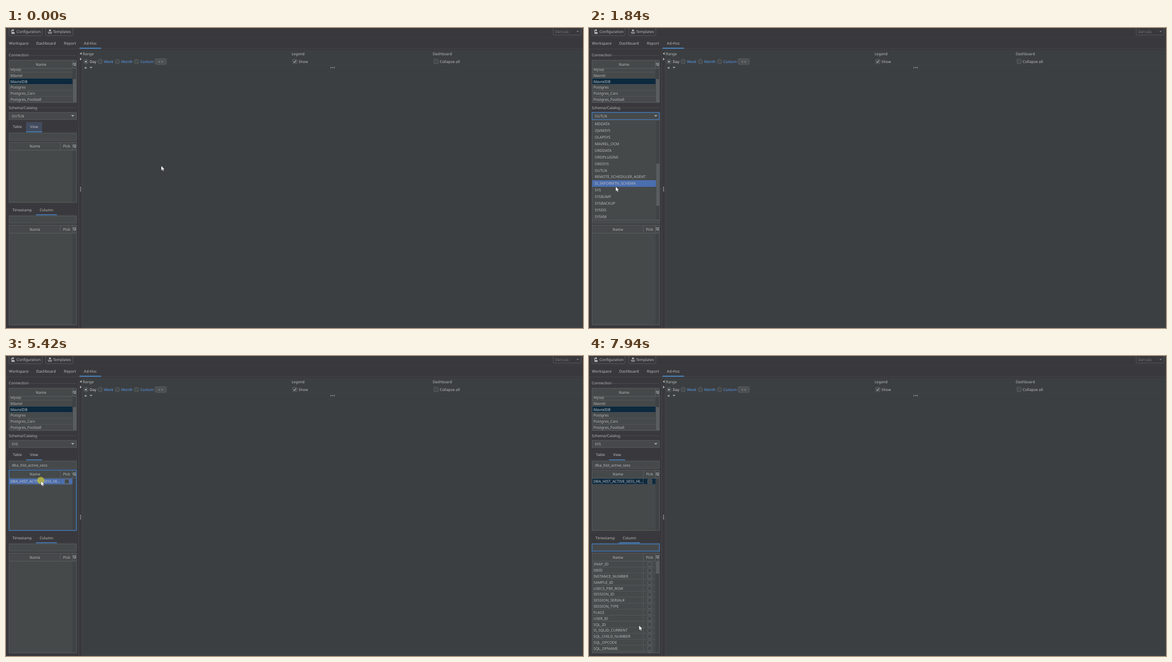
An HTML page with a canvas that plays this animation: 1037 px wide and 540 px high, repeating every 8000 ms.

```html
<!DOCTYPE html>
<html lang="en">
<head>
<meta charset="utf-8">
<title>Ad-hoc query panel</title>
<style>
html, body { margin: 0; width: 100%; height: 100%; overflow: hidden; background: #3c3f41; }
canvas { display: block; }
</style>
</head>
<body>
<canvas id="stage" width="1037" height="540"></canvas>
<script>
const ctx = document.getElementById('stage').getContext('2d');
const LOOP = 8000, TICK = 67.7, ROW = 10.83, OPTION = 11.92, OPTION_TOP = 166.7;
const C = {
  side: '#39383c', main: '#3c3f41', cell: '#45494a', line: '#5e6163', grid: '#595c5e', faint: '#47494b',
  text: '#bbbbbb', link: '#589df6', accent: '#4a88c7', focus: '#4374ad',
  select: '#4b6eaf', dimSelect: '#0d293e', track: '#3f4244', thumb: '#5a5d5f',
  tabFocus: '#424b5e', tabHover: '#313236', off: '#777a7c'
};

const connections = ['MySql', 'Mavrel', 'MavrelDB', 'Postgres', 'Postgres_Cars', 'Postgres_Football'];
const schemas = ['MDDATA', 'OJVMSYS', 'OLAPSYS', 'MAVREL_OCM', 'ORDDATA', 'ORDPLUGINS', 'ORDSYS', 'OUTLN',
  'REMOTE_SCHEDULER_AGENT', 'SI_INFORMTN_SCHEMA', 'SYS', 'SYS$UMF', 'SYSBACKUP', 'SYSDG', 'SYSKM'];
const views = ['ACLMV$_BASE_VIEW', 'ACLMV$_MVINFO', 'ALL$OLAP2_AWS', 'ALL_ALL_TABLES', 'ALL_ANALYTIC_VIEWS',
  'ALL_ANALYTIC_VIEW_ATTR...', 'ALL_ANALYTIC_VIEW_BASE...', 'ALL_ANALYTIC_VIEW_CALC...', 'ALL_ANALYTIC_VIEW_CLASS...'];
const columns = ['SNAP_ID', 'DBID', 'INSTANCE_NUMBER', 'SAMPLE_ID', 'USECS_PER_ROW', 'SESSION_ID', 'SESSION_SERIAL#',
  'SESSION_TYPE', 'FLAGS', 'USER_ID', 'SQL_ID', 'IS_SQLID_CURRENT', 'SQL_CHILD_NUMBER', 'SQL_OPCODE', 'SQL_OPNAME', ''];

// Pointer stops: time, x, y
const path = [[0, 279, 248], [810, 104, 185], [1010, 119, 158], [1150, 118, 160], [1422, 79, 204], [1625, 55, 268],
  [1828, 48, 285.5], [2120, 48, 285.5], [2166, 48, 288], [2640, 48, 288], [3250, 68, 183], [3385, 70, 197],
  [4670, 70, 197], [4880, 47, 216], [5078, 58, 222], [5278, 63, 225], [5480, 63, 225], [6025, 70, 323],
  [6230, 72, 326], [6500, 72, 326], [6770, 63, 347], [7400, 63, 347], [7921, 90, 485]];
const clicks = [1080, 2500, 5270, 6220, 6970];
const focusTimes = [[0, 'view'], [1080, 'combo'], [3440, 'search'], [5270, 'table'], [6420, 'column'], [7030, 'search2']];

function pointer(t) {
  const i = path.findIndex(p => p[0] > t);
  if (i < 0) return path[path.length - 1].slice(1);
  if (i === 0) return path[0].slice(1);
  const a = path[i - 1], b = path[i];
  let u = (t - a[0]) / (b[0] - a[0]);
  u = u * u * (3 - 2 * u);
  return [a[1] + (b[1] - a[1]) * u, a[2] + (b[2] - a[2]) * u];
}

function rect(x, y, w, h, color) {
  ctx.fillStyle = color;
  ctx.fillRect(x, y, w, h);
}
function frame(x, y, w, h, color, width = 1) {
  ctx.strokeStyle = color;
  ctx.lineWidth = width;
  ctx.strokeRect(x, y, w, h);
}
function rounded(x, y, w, h, stroke, fill, r = 1.5) {
  ctx.beginPath();
  ctx.roundRect(x, y, w, h, r);
  if (fill) { ctx.fillStyle = fill; ctx.fill(); }
  ctx.strokeStyle = stroke;
  ctx.lineWidth = 0.8;
  ctx.stroke();
}
function text(s, x, cy, color = C.text, align = 'left', size = 6.68) {
  ctx.font = size + 'px "Noto Sans", sans-serif';
  ctx.textRendering = 'geometricPrecision';
  ctx.textAlign = align;
  ctx.fillStyle = color;
  ctx.fillText(s, x, cy + 2.4);
}
function poly(points, color) {
  ctx.beginPath();
  points.forEach(p => ctx.lineTo(...p));
  ctx.closePath();
  ctx.fillStyle = color;
  ctx.fill();
}
function disc(x, y, r, color) {
  ctx.beginPath();
  ctx.arc(x, y, r, 0, 7);
  ctx.fillStyle = color;
  ctx.fill();
}
function clipped(x, y, w, h, draw) {
  ctx.save();
  ctx.beginPath();
  ctx.rect(x, y, w, h);
  ctx.clip();
  draw();
  ctx.restore();
}
const down = (x, y, color, r = 3) => poly([[x - r, y - r / 2], [x + r, y - r / 2], [x, y + r / 2]], color);

function checkbox(x, y, checked) {
  rounded(x, y, 7.6, 7.6, '#66696b', '#43494a', 1);
  if (!checked) return;
  ctx.strokeStyle = '#b5b8ba';
  ctx.lineWidth = 1.1;
  ctx.beginPath();
  ctx.moveTo(x + 1.8, y + 3.8);
  ctx.lineTo(x + 3.3, y + 5.6);
  ctx.lineTo(x + 6, y + 1.8);
  ctx.stroke();
}
function radio(x, label, on) {
  rounded(x - 4, 56.5, 8, 8, '#66696b', '#43494a', 4);
  if (on) disc(x, 60.5, 1.6, '#b8babc');
  text(label, x + 6.8, 60.5, on ? '#d0d0d0' : C.link);
}
function section(label, y, lineStart) {
  text(label, 5, y);
  rect(lineStart, y, 126 - lineStart, 0.8, '#505254');
}
function tab(label, x, w, y, selected, focused, hovered) {
  if (focused || hovered) rect(x, y, w, 18.3, focused ? C.tabFocus : C.tabHover);
  text(label, x + w / 2, y + 8.6, C.text, 'center');
  if (selected) rect(x, y + 16.9, w, 1.5, C.accent);
}
function field(y, value, focused, caret) {
  rect(5.5, y, 121, 13, C.cell);
  frame(5.5, y, 121, 13, focused ? C.focus : C.line, focused ? 1.6 : 0.8);
  text(value, 10.5, y + 7);
  if (caret) rect(value ? 73.8 : 10.4, y + 2.3, 0.8, 9, '#c8c8c8');
}
function table(top, bottom, firstRow, rows, opt) {
  const body = top + 15;
  rect(5.5, top, 121, bottom - top, C.cell);
  rect(119.5, body, 7, bottom - body, C.track);
  if (opt.thumb) rect(120.2, opt.thumb[0], 6, opt.thumb[1], C.thumb);
  clipped(6, body, 120, bottom - body - 0.5, () => rows.forEach((name, i) => {
    const y = firstRow + i * ROW, selected = i === opt.selected;
    if (selected) rect(6, y, 113.5, ROW, opt.focused ? C.select : C.dimSelect);
    clipped(6, body, opt.pick ? 91 : 113, bottom - body, () => text(name, 8, y + 5.4, selected ? '#c8c8c8' : C.text));
    rect(6, y + ROW - 0.7, 113.5, 0.7, C.grid);
    if (opt.pick) {
      rect(97.2, y, 0.7, ROW, C.grid);
      checkbox(105.5, y + 1.6);
    }
  }));
  rect(5.5, body - 0.7, 121, 0.8, C.line);
  rect(119.2, top, 0.7, 15, C.line);
  const mid = top + 7.6;
  text('Name', opt.pick ? 52 : 63, mid, C.text, 'center');
  if (opt.pick) {
    rect(97.2, top, 0.7, 15, C.line);
    text('Pick', 109, mid, C.text, 'center');
  }
  frame(120.8, mid - 2.6, 4.4, 3.6, '#a7aaac', 0.7);
  rect(120.8, mid - 1.4, 4.4, 0.6, '#a7aaac');
  down(123.8, mid + 2, '#b8babc', 1.7);
  frame(5.5, top, 121, bottom - top, opt.focused ? C.focus : C.line, opt.focused ? 1.6 : 0.8);
}

function drawTop() {
  rounded(5.3, -4, 59.6, 17.7, C.line);
  disc(12.5, 4, 1.8, '#b8babc');
  poly([[9.3, 10.5], [10.3, 7.2], [15, 7.2], [16, 10.5]], '#b8babc');
  rect(9.3, 3.2, 1.1, 4.5, '#b8babc');
  text('Configuration', 18.8, 6.7);
  rounded(71.3, -4, 48.8, 17.7, C.line);
  disc(79, 4.2, 1.8, '#b8babc');
  rect(75, 7.2, 8, 1, '#b8babc');
  rect(76, 9.2, 6.2, 1, '#b8babc');
  text('Templates', 84.5, 6.7);
  rounded(983.3, -4, 50.2, 16.8, C.line);
  text('Darcula', 987, 6.7, C.off);
  down(1027.5, 6.5, C.off, 2.5);
  rect(0, 16.5, 1037, 0.7, '#414246');
  [['Workspace', 23], ['Dashboard', 72], ['Report', 115], ['Ad-Hoc', 151.7]].forEach(([s, x]) => text(s, x, 27.5, C.text, 'center', 6.85));
  rect(0, 37, 1037, 0.8, C.faint);
  rect(132, 35.5, 39, 1.8, C.accent);
}

function drawMain() {
  rect(137, 41, 900, 499, C.main);
  rect(137, 40.5, 900, 0.7, '#424547');
  rect(130, 41, 0.8, 499, C.faint);
  rect(136.6, 41, 0.8, 499, C.faint);
  poly([[135.8, 43.5], [135.8, 48.5], [132.6, 46]], '#adb0b2');
  poly([[133, 53.5], [133, 58.5], [136.2, 56]], '#adb0b2');
  [287, 290, 293].forEach(y => disc(134, y, 0.9, '#b5b8ba'));
  text('Range', 138, 46.5);
  text('Legend', 513.3, 46.5);
  text('Dashboard', 767, 46.5);
  radio(143.7, 'Day', true);
  radio(169.2, 'Week');
  radio(200.2, 'Month');
  radio(234.6, 'Custom');
  rounded(268, 55.3, 20, 10.3, C.line, '#4c5052');
  text('< <', 278, 60.3, C.text, 'center', 6.2);
  checkbox(515.3, 56.5, true);
  text('Show', 525.8, 60.5);
  checkbox(769.2, 56.5);
  text('Collapse all', 779.4, 60.5, C.text, 'left', 6.85);
  rect(137, 67.3, 900, 0.7, '#424547');
  poly([[140.5, 72.8], [145.7, 72.8], [143.1, 69.8]], '#adb0b2');
  down(152.8, 71.3, '#adb0b2', 2.6);
  [584, 587, 590].forEach(x => disc(x, 71.3, 0.9, '#b5b8ba'));
  rect(137, 537.5, 900, 0.7, C.faint);
}

function drawPopup(t) {
  rect(5.5, 165.8, 121.5, 180, C.cell);
  const y = pointer(t - 68)[1];
  const active = t < 1160 || y < OPTION_TOP ? 7 : Math.floor((y - OPTION_TOP) / OPTION);
  rect(6, OPTION_TOP + active * OPTION, 114.8, OPTION, C.select);
  schemas.forEach((name, i) => text(name, 10.3, OPTION_TOP + (i + 0.5) * OPTION));
  rect(120.8, 166.3, 6, 179, C.track);
  rect(120.8, 244, 6, 76, C.thumb);
  frame(5.5, 165.8, 121.5, 180, C.line, 0.8);
}

function drawPointer(t) {
  const [x, y] = pointer(t);
  if (clicks.some(c => t >= c && t < c + 230)) disc(x - 0.5, y - 1, 6.5, 'rgba(190,186,58,.8)');
  const overField = x < 127 && (y > 189 && y < 203 || y > 338 && y < 352) && !(t > 1080 && t < 2640);
  if (overField) {
    const beam = 'rgba(225,225,225,.75)';
    rect(x - 0.4, y - 3.8, 0.7, 8, beam);
    rect(x - 1.6, y - 4.5, 3.1, 0.7, beam);
    rect(x - 1.6, y + 4.2, 3.1, 0.7, beam);
    return;
  }
  const arrow = [[0, 0], [0, 8.6], [2, 6.8], [3.3, 9.7], [4.7, 9.1], [3.4, 6.3], [6, 6.2]].map(p => [x + p[0], y + p[1]]);
  poly(arrow, '#ffffff');
  ctx.strokeStyle = 'rgba(32,34,36,.7)';
  ctx.lineWidth = 0.5;
  ctx.stroke();
}

function draw(t) {
  const focus = focusTimes.filter(f => f[0] <= t).pop()[1];
  const popup = t >= 1080 && t < 2640;
  const [px, py] = pointer(t);
  const over = (x, w, y) => !popup && px > x && px < x + w && py > y && py < y + 18.5;
  const filtered = t >= 4460, loaded = t >= 2700;

  rect(0, 0, 1037, 540, C.side);
  drawTop();
  drawMain();

  section('Connection', 49, 42);
  table(58, 134, 69.2, connections, { selected: 2, thumb: [92, 41.5] });
  section('Schema/Catalog', 143.3, 58);
  rect(5.5, 152, 121, 12.8, C.cell);
  const comboFocus = focus === 'combo';
  frame(5.5, 152, 121, 12.8, comboFocus ? C.focus : C.line, comboFocus ? 1.6 : 0.8);
  text(t < 2640 ? 'OUTLN' : 'SYS', 10.3, 158.6);
  down(120, 158.3, '#adb0b2');

  const upperTabs = 169.3, lowerTabs = 318.6;
  rect(5, upperTabs + 18, 122, 0.7, C.faint);
  tab('Table', 6, 29, upperTabs, false, false, over(6, 29, upperTabs));
  tab('View', 36, 29, upperTabs, true, focus === 'view', over(36, 29, upperTabs));
  const caret = t < 3850 || t >= 4390 && t < 4850;
  field(189.3, t >= 4390 ? 'dba_hist_active_sess' : '', focus === 'search', focus === 'search' && caret);
  table(205.3, 314, 220.4, filtered ? ['DBA_HIST_ACTIVE_SESS_HI...'] : loaded ? views : [], {
    pick: true, focused: focus === 'table', selected: t >= 5270 ? 0 : -1,
    thumb: loaded && !filtered && [220.4, 6]
  });

  rect(5, lowerTabs + 18, 122, 0.7, C.faint);
  tab('Timestamp', 6, 46, lowerTabs, false, false, over(6, 46, lowerTabs));
  tab('Column', 54, 37.5, lowerTabs, true, focus === 'column', over(54, 37.5, lowerTabs));
  field(338.3, '', focus === 'search2', focus === 'search2' && t < 7440);
  const described = t >= 5550;
  table(354.5, 534.5, 369.5, described ? columns : [], { pick: true, thumb: described && [369.8, 22] });

  if (popup) drawPopup(t);
  drawPointer(t);
}

function loop() {
  const t = performance.now() % LOOP;
  draw(Math.floor((t + 8) / TICK) * TICK);
  requestAnimationFrame(loop);
}
loop();
</script>
</body>
</html>
```
